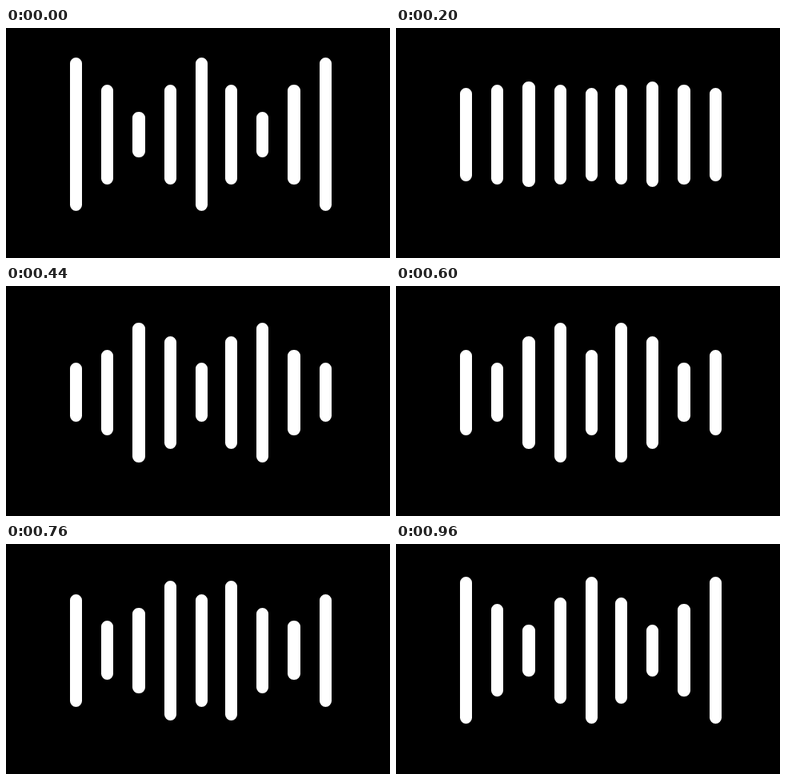
An HTML page with a canvas for the animation above (1000 ms loop, 480 px wide and 288 px high).

```html
<!DOCTYPE html>
<html lang="en">
<head>
<meta charset="utf-8">
<title>Sound bars</title>
<style>
  html, body { margin: 0; width: 100%; height: 100%; overflow: hidden; background: #000; }
  canvas { display: block; }
</style>
</head>
<body>
<canvas id="stage" width="480" height="288"></canvas>
<script>
const ctx = document.getElementById("stage").getContext("2d");
const LOOP = 1000, STEP = 40;
const KEYS = [0, 360, 680, LOOP];

// Bar tops at each key time
const LOW = 104.8, MID = 71.1, HIGH = 37.2;
const AXIS_SUM = 266.68; // top + bottom of every bar
const A = [HIGH, LOW, MID, HIGH];
const B = [MID, MID, LOW, MID];
const C = [LOW, HIGH, MID, LOW];
const D = [MID, MID, HIGH, MID];

// left, right, tops
const bars = [
  [80, 95, A], [119, 134, B], [158, 174, C], [198, 213, D], [237, 252, A],
  [274, 289, D], [313, 328, C], [352, 368, B], [392, 407, A]
];

function topAt(tops, t) {
  const i = t < KEYS[1] ? 0 : t < KEYS[2] ? 1 : 2;
  const p = (t - KEYS[i]) / (KEYS[i + 1] - KEYS[i]);
  return tops[i] + (tops[i + 1] - tops[i]) * p;
}

function draw(t) {
  ctx.fillStyle = "#000";
  ctx.fillRect(0, 0, 480, 288);
  ctx.fillStyle = "#fff";
  ctx.beginPath();
  for (const [left, right, tops] of bars) {
    const y = topAt(tops, t);
    const top = Math.round(y), bottom = Math.round(AXIS_SUM - y);
    ctx.roundRect(left, top, right - left, bottom - top, 7.5);
  }
  ctx.fill();
}

const start = performance.now();
function tick() {
  const t = (performance.now() - start) % LOOP;
  draw(Math.floor(t / STEP) * STEP);
  requestAnimationFrame(tick);
}
tick();
</script>
</body>
</html>
```
